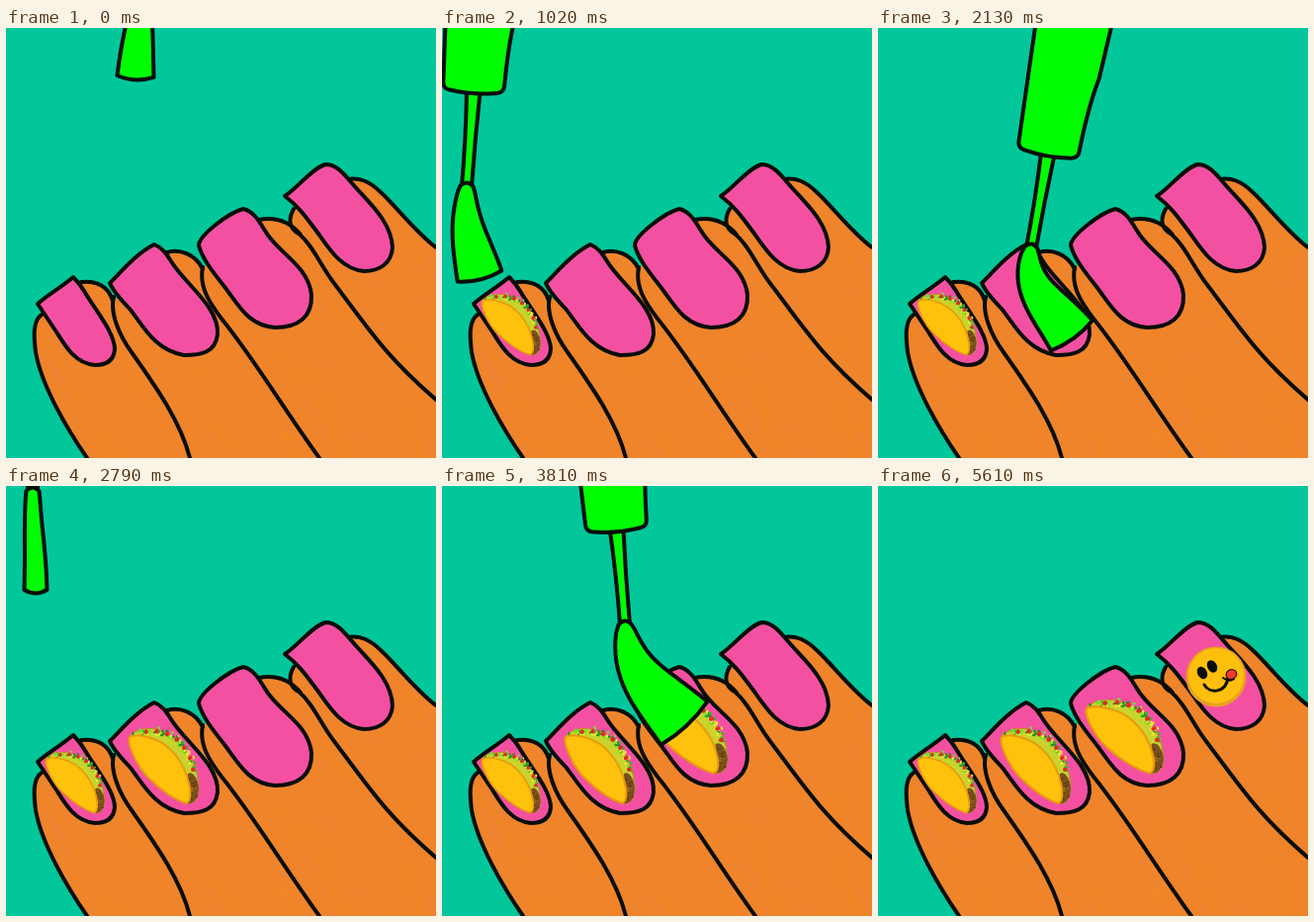
Write an HTML page with a canvas that moves like this. It is 435x435 px and loops after 5.67 s.

```html
<!DOCTYPE html>
<html lang="en">
<head>
<meta charset="utf-8">
<title>Taco nails</title>
<style>
html, body { margin: 0; width: 100%; height: 100%; overflow: hidden; background: #02c79b; }
canvas { display: block; width: 435px; height: 435px; }
</style>
</head>
<body>
<canvas id="stage" width="435" height="435"></canvas>
<script>
const SIZE = 435, LOOP = 5670, STEP = 30, BRUSH_END = 5610;
const INK = '#080d08', PINK = '#f450a2', GREEN = '#02fc04', SKIN = '#ef842b';
const ctx = document.getElementById('stage').getContext('2d');

// time, tip x, tip y, tip angle, tip width, neck x, neck y, stem lean
const KEYS = [
  [0, 131, 49, -3, 37, 139, -46, 5],
  [540, 93, 326, 30, 46, 84, 232, 23],
  [1020, 38, 251, 14, 46, 25, 160, 4],
  [1410, 75, 110, 0, 34, 78, 12, 8],
  [1740, 128, 215, 12, 36, 150, 118, 16],
  [2130, 196, 311, 36, 52, 155, 222, 10],
  [2250, 192, 325, 36, 50, 160, 232, 14],
  [2550, 110, 200, 14, 40, 100, 104, 0],
  [2790, 30, 105, 0, 23, 27, 5, 0],
  [3390, 275, 272, 30, 46, 250, 178, 18],
  [3540, 292, 312, 40, 54, 262, 220, 25],
  [3810, 245, 240, 43, 64, 185, 140, -5],
  [3990, 165, 190, 20, 44, 150, 92, -10],
  [4290, 240, 95, 5, 34, 245, 0, 5],
  [4710, 364, 239, 8, 37, 349, 120, 8],
  [4890, 392, 280, 20, 40, 370, 184, 15],
  [5130, 275, 212, 10, 38, 255, 115, -4],
  [5610, 205, -8, 0, 34, 205, -106, 0]
];

const NAILS = [
  'M32 279C42 270 55 263 68 252C72 256 75 259 79 266C90 285 110 308 110 325C109 338 100 341 90 341C70 339 60 322 52 309C46 300 38 288 32 279Z',
  'M105 258C118 245 132 228 150 219C158 222 162 228 167 236C180 258 216 282 214 310C212 328 198 331 180 331C150 326 138 300 125 284C116 274 109 268 105 258Z',
  'M195 220C195 210 225 187 240 183C250 185 256 195 262 205C275 228 306 240 309 270C310 292 296 303 272 303C245 301 235 280 222 263C212 250 199 235 195 220Z',
  'M282 170C295 162 308 143 323 138C335 138 342 148 350 157C365 175 390 195 391 222C390 238 378 246 362 246C340 244 328 225 316 208C306 195 298 182 282 170Z'
].map(d => new Path2D(d));

const HAND = new Path2D('M36 290C27 296 28 312 30 328C36 362 62 406 82 435H435V222C414 206 396 182 380 167C368 155 358 151 345 153L291 183C286 193 287 200 297 208C286 195 272 191 256 194L210 235L198 243C192 229 176 223 163 227L115 270L108 278C104 262 92 255 76 257L60 275Z');
const LINES = new Path2D(
  'M36 290C27 296 28 312 30 328C36 362 62 406 82 435' +
  'M76 257C92 255 104 262 108 276' +
  'M109 272C105 288 114 310 127 328C148 358 176 396 186 435' +
  'M163 227C176 223 192 229 199 244' +
  'M199 242C195 262 206 278 218 294C252 336 280 384 317 435' +
  'M256 194C272 191 287 196 298 209' +
  'M291 183C285 194 287 203 296 208C310 219 318 240 331 257C368 306 384 332 435 376' +
  'M345 153C358 151 368 155 380 167C396 182 414 206 435 222');

const FILLING = new Path2D('M1 8C10-2 30-2 43 8C60 18 71 42 71 62C70 72 66 77 59 76Z');
const BEEF = new Path2D('M60 46C66 42 71 54 71 62C70 72 66 77 59 76Z');
const SHELL = new Path2D('M1 9C-2 15 8 38 20 50C34 64 46 72 58 76C64 74 63 65 61 56C57 36 42 15 23 10C14 7 6 6 1 9Z');

// x, y, x scale, y scale
const TACOS = [[40, 269, 0.84, 0.81], [124, 245, 1, 1], [210, 216, 1.11, 0.98]];
const REVEALS = [[540, 960], [2250, 2580], [3540, 3960], [4890, 5130]];

const rad = deg => deg * Math.PI / 180;

function random(seed) {
  return () => {
    seed = (seed * 16807) % 2147483647;
    return seed / 2147483647;
  };
}

// Cubic easing through the keys, at rest wherever a value turns back
function slope(i, c) {
  const a = KEYS[i - 1], b = KEYS[i], d = KEYS[i + 1];
  if (!a) return (d[c] - b[c]) / (d[0] - b[0]);
  if (!d) return (b[c] - a[c]) / (b[0] - a[0]);
  if ((b[c] - a[c]) * (d[c] - b[c]) <= 0) return 0;
  return (d[c] - a[c]) / (d[0] - a[0]);
}

function poseAt(t) {
  let i = 0;
  while (i < KEYS.length - 2 && t >= KEYS[i + 1][0]) i++;
  const a = KEYS[i], b = KEYS[i + 1], span = b[0] - a[0];
  const u = Math.min(1, (t - a[0]) / span), v = 1 - u;
  const at = c => a[c] * (1 + 2 * u) * v * v + b[c] * u * u * (3 - 2 * u) +
    span * u * v * (slope(i, c) * v - slope(i + 1, c) * u);
  const [x, y, angle, width, nx, ny, lean] = [1, 2, 3, 4, 5, 6, 7].map(at);
  return { x, y, angle: rad(angle), width, nx, ny, lean: rad(lean) };
}

function paint(path, fill, line = INK, width = 4) {
  ctx.fillStyle = fill;
  ctx.fill(path);
  ctx.strokeStyle = line;
  ctx.lineWidth = width;
  ctx.stroke(path);
}

function oval(x, y, rx, ry, color, turn = 0) {
  ctx.fillStyle = color;
  ctx.beginPath();
  ctx.ellipse(x, y, rx, ry, turn, 0, Math.PI * 2);
  ctx.fill();
}

function drawHand() {
  ctx.fillStyle = SKIN;
  ctx.fill(HAND);
  ctx.save();
  ctx.clip(HAND);
  const rnd = random(41);
  ctx.lineWidth = 9;
  for (let i = 0; i < 45; i++) {
    const x = 30 + rnd() * 400, y = 210 + rnd() * 225, len = 15 + rnd() * 35;
    ctx.strokeStyle = i % 2 ? 'rgba(240,125,75,.13)' : 'rgba(238,138,28,.16)';
    ctx.beginPath();
    ctx.moveTo(x, y);
    ctx.lineTo(x + len * 0.6, y + len);
    ctx.stroke();
  }
  ctx.restore();
  ctx.strokeStyle = INK;
  ctx.lineWidth = 4;
  ctx.stroke(LINES);
  NAILS.forEach(nail => paint(nail, PINK));
}

function drawTaco([x, y, sx, sy]) {
  ctx.save();
  ctx.translate(x, y);
  ctx.scale(sx, sy);
  paint(FILLING, '#c8d42c', '#b59a1c', 1);
  ctx.fillStyle = '#79501c';
  ctx.fill(BEEF);
  const rnd = random(77);
  const colors = ['#35b52a', '#f4ea35', '#70e02c', '#238c25'];
  for (let i = 0; i < 64; i++) {
    const a = rad(-118 + rnd() * 110), r = 0.88 + rnd() * 0.14;
    const px = 24 + 45 * r * Math.cos(a), py = 50 + 50 * r * Math.sin(a);
    oval(px, py, 1.9, 1.1, colors[i % 4], rnd() * 3);
  }
  for (let i = 0; i < 7; i++) {
    const a = rad(-100 + i * 15);
    oval(25 + 41 * Math.cos(a), 50 + 47 * Math.sin(a), 2.4, 2, '#e22a20', a);
  }
  for (let i = 0; i < 14; i++) {
    oval(62 + rnd() * 7, 50 + rnd() * 22, 1.2, 1, i % 2 ? '#9a6b26' : '#563712');
  }
  paint(SHELL, '#ffc20c', '#e99a0d', 2);
  ctx.restore();
}

function drawSmiley() {
  oval(342, 193, 30.5, 30.5, '#e9a022');
  oval(342, 192, 28, 28, '#ffbf0d');
  oval(328, 189, 4.8, 6.5, INK, -0.5);
  oval(338, 182.5, 4.8, 6.5, INK, -0.5);
  ctx.strokeStyle = INK;
  ctx.lineWidth = 3;
  ctx.beginPath();
  ctx.moveTo(330, 201);
  ctx.bezierCurveTo(336, 211, 352, 209, 354, 194);
  ctx.stroke();
  ctx.lineWidth = 2;
  ctx.beginPath();
  ctx.moveTo(349, 194);
  ctx.quadraticCurveTo(356, 199, 360, 195);
  ctx.stroke();
  oval(357.5, 190.5, 6, 5.3, INK, -0.4);
  oval(357.5, 190.5, 5, 4.3, '#f13a2b', -0.4);
}

// Art appears behind the tip while the brush is pulled back
function drawArt(t, pose) {
  REVEALS.forEach(([from, to], i) => {
    if (t < from) return;
    ctx.save();
    if (t < to) {
      ctx.translate(pose.x, pose.y);
      ctx.rotate(-pose.angle);
      ctx.beginPath();
      ctx.rect(-SIZE, 0, SIZE * 2, SIZE);
      ctx.rotate(pose.angle);
      ctx.translate(-pose.x, -pose.y);
      ctx.clip();
    }
    if (i < 3) drawTaco(TACOS[i]);
    else drawSmiley();
    ctx.restore();
  });
}

function bristles({ x, y, angle, width, nx, ny, lean }) {
  const reach = 0.42 * Math.hypot(x - nx, y - ny);
  const ax = nx - Math.sin(lean) * reach, ay = ny + Math.cos(lean) * reach;
  const bx = x - Math.sin(angle) * reach, by = y - Math.cos(angle) * reach;
  const left = [], right = [];
  for (let i = 0; i <= 20; i++) {
    const u = i / 20, v = 1 - u;
    const mix = (p, q, r, s) => p * v * v * v + 3 * q * u * v * v + 3 * r * u * u * v + s * u * u * u;
    const slopeOf = (p, q, r, s) => (q - p) * v * v + 2 * (r - q) * u * v + (s - r) * u * u;
    const px = mix(nx, ax, bx, x), py = mix(ny, ay, by, y);
    const dx = slopeOf(nx, ax, bx, x), dy = slopeOf(ny, ay, by, y);
    const half = (6.5 + (width / 2 - 6.5) * Math.pow(u, 0.7)) / Math.hypot(dx, dy);
    left.push([px - dy * half, py + dx * half]);
    right.push([px + dy * half, py - dx * half]);
  }
  const path = new Path2D();
  path.moveTo(...left[0]);
  left.forEach(p => path.lineTo(...p));
  path.quadraticCurveTo(x + Math.sin(angle) * 7, y + Math.cos(angle) * 7, ...right[20]);
  right.reverse().forEach(p => path.lineTo(...p));
  path.quadraticCurveTo(nx + Math.sin(lean) * 7, ny - Math.cos(lean) * 7, ...left[0]);
  path.closePath();
  return path;
}

function drawBrush(pose) {
  const stem = new Path2D('M-5 2Q-4-50-7-100H7Q5-50 5 2Z');
  const cap = new Path2D('M-38-320L-31-104Q-31-97-24-96Q0-92 24-96Q31-97 31-104Q32-150 38-180L46-320Z');
  ctx.save();
  ctx.translate(pose.nx, pose.ny);
  ctx.rotate(pose.lean);
  paint(stem, GREEN);
  ctx.restore();
  paint(bristles(pose), GREEN);
  ctx.save();
  ctx.translate(pose.nx, pose.ny);
  ctx.rotate(pose.lean);
  paint(cap, GREEN);
  ctx.restore();
}

function draw(t) {
  const pose = poseAt(t);
  ctx.lineJoin = ctx.lineCap = 'round';
  ctx.fillStyle = '#02c79b';
  ctx.fillRect(0, 0, SIZE, SIZE);
  drawHand();
  drawArt(t, pose);
  if (t < BRUSH_END) drawBrush(pose);
}

const start = performance.now();
function tick() {
  const t = (performance.now() - start) % LOOP;
  draw(Math.floor(t / STEP) * STEP);
  requestAnimationFrame(tick);
}
tick();
</script>
</body>
</html>
```
